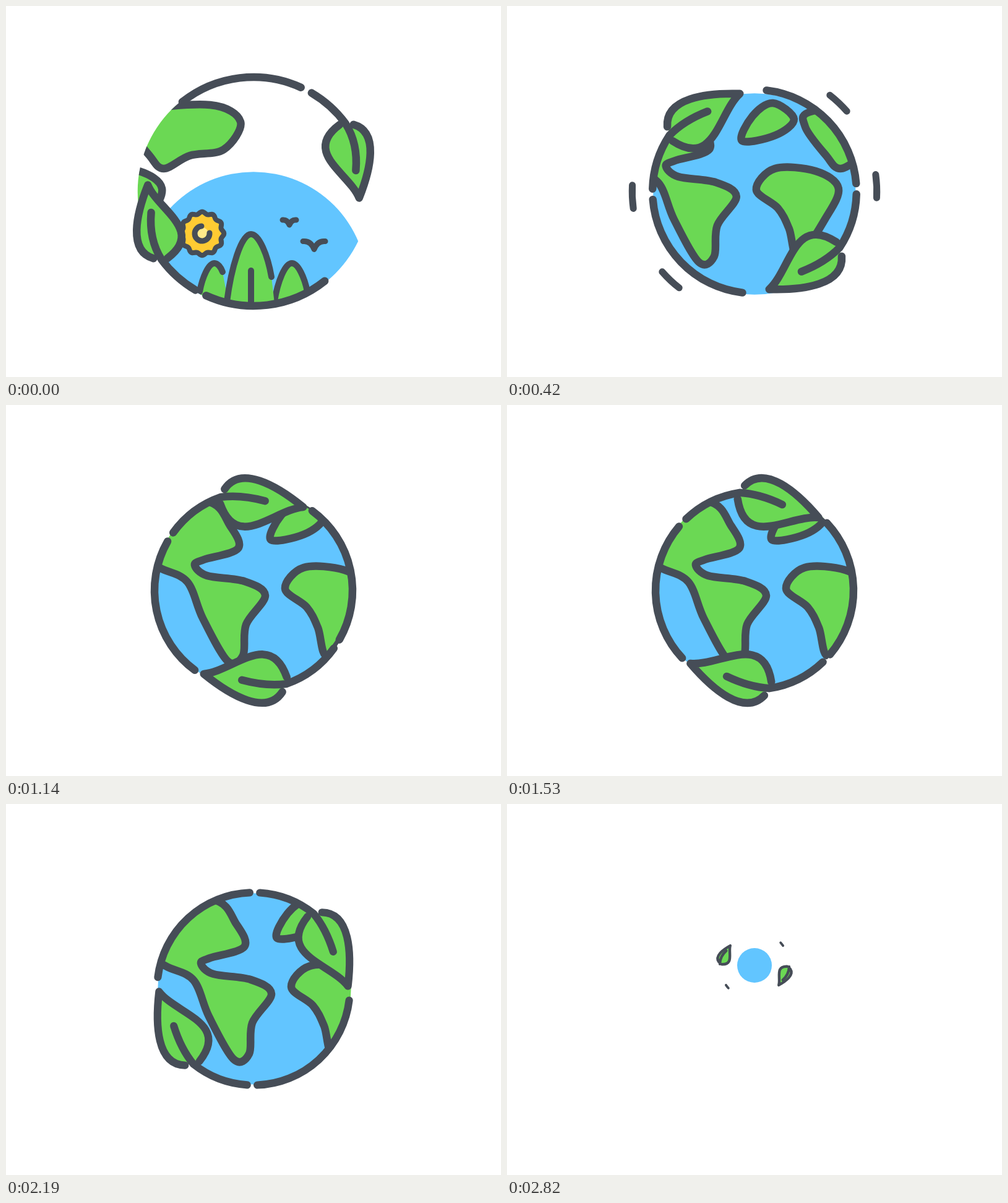
Recreate the animation shown at these times as an HTML page with a canvas. Size 800 by 600 pixels, loop 2.85 s.

```html
<!DOCTYPE html>
<html lang="en">
<head>
<meta charset="utf-8">
<title>Green planet</title>
<style>
html, body { margin: 0; width: 100%; height: 100%; overflow: hidden; background: #fff; }
canvas { display: block; width: 800px; height: 600px; }
</style>
</head>
<body>
<canvas id="stage" width="800" height="600"></canvas>
<script>
const ctx = document.getElementById('stage').getContext('2d');
const DARK = '#464d57', GREEN = '#6bd854', BLUE = '#62c5ff', GOLD = '#ffcb33';
const LOOP = 2850, STEP = 30, RADIUS = 160, RAD = Math.PI / 180;

// Key points of the coasts, in stage coordinates with the globe at rest.
const AMERICA = [[325,156],[362,195],[375,232],[320,250],[305,259],[325,276],[385,285],[419,308],
  [388,355],[383,405],[358,414],[318,345],[293,286],[248,263],[190,230],[215,165]];
const ISLAND = [[428,218],[445,178],[478,157],[512,183],[482,209]];
const AFRICA = [[451,297],[481,263],[547,267],[584,295],[562,345],[519,405],[504,360],[486,327]];
const ASIA = [[542,170],[530,195],[564,242],[587,263],[629,242],[684,232],[711,187],[662,160]];

const ramp = (t, from, to) => Math.min(1, Math.max(0, (t - from) / (to - from)));
const mix = (a, b, k) => a + (b - a) * k;
const remain = (t, end, power) => Math.pow(1 - ramp(t, 0, end), power);

function pose(t) {
  const intro = remain(t, 1140, 3.2);
  const exit = Math.max(0, t - 2030) / 790;
  const grow = p => Math.pow(exit, p);
  return {
    size: 1 + 0.156 * remain(t, 1140, 3.6) - 0.65 * grow(2),
    midY: 300 - 39 * grow(2.25),
    turn: 0.027 * t - 86.5 * intro + 233 * grow(1.3),
    tipGap: 5.6 + 42.4 * intro + 135 * grow(2.4),
    sideGap: 92 + 22 * intro + 48 * grow(3),
    young: remain(t, 1140, 3.6) + 1.4 * grow(3),
    shift: 274 * grow(2.07) - 332 * remain(t, 1140, 4.2),
    sea: 159 - 79 * grow(4),
    rise: 152 * remain(t, 660, 3.4)
  };
}

// Closed smooth curve through the points.
function loopPath(pts) {
  const at = i => pts[(i + pts.length) % pts.length];
  ctx.beginPath();
  ctx.moveTo(...pts[0]);
  pts.forEach((b, i) => {
    const a = at(i - 1), c = at(i + 1), d = at(i + 2);
    ctx.bezierCurveTo(b[0] + (c[0] - a[0]) / 6, b[1] + (c[1] - a[1]) / 6,
      c[0] - (d[0] - b[0]) / 6, c[1] - (d[1] - b[1]) / 6, c[0], c[1]);
  });
  ctx.closePath();
}

function fill(color) { ctx.fillStyle = color; ctx.fill(); }

function disc(x, y, r) {
  ctx.beginPath();
  ctx.arc(x, y, r, 0, Math.PI * 2);
}

// Angles are clockwise from straight up.
function arc(r, from, to) { ctx.arc(0, 0, r, (from - 90) * RAD, (to - 90) * RAD); }

function strokeArc(r, from, to) {
  ctx.beginPath();
  arc(r, from, to);
  ctx.stroke();
}

function land(pts) {
  loopPath(pts);
  fill(GREEN);
  ctx.stroke();
}

// The tip sits straight above the globe centre; a young leaf is smaller and tilted.
function leaf(young) {
  const k = 1 - 0.21 * young;
  ctx.save();
  ctx.translate(0, -157 + 9 * young);
  ctx.rotate(10 * young * RAD);
  ctx.scale(k, k);
  ctx.beginPath();
  ctx.moveTo(-124, 40);
  ctx.bezierCurveTo(-122, -7, -55, -8, 0, 0);
  ctx.bezierCurveTo(-38, 27, -55, 117, -118, 64);
  ctx.restore();
  fill(GREEN);
  ctx.stroke();
}

function rim({ sideGap, tipGap, young }) {
  if (tipGap < sideGap - 3) strokeArc(RADIUS, tipGap, sideGap - 3);
  const leave = mix(-50, -40, young);
  ctx.beginPath();
  arc(RADIUS, Math.min(sideGap - 177, leave - 1), leave);
  ctx.quadraticCurveTo(mix(-97, -76, young), mix(-123, -142, young),
    mix(-58, -38, young), mix(-134, -141, young));
  ctx.stroke();
}

function dash(r, mid, length) {
  for (const turn of [0, 180]) strokeArc(r, mid + turn - length / 2, mid + turn + length / 2);
}

// The right flank is drawn only part of the way down.
function tree(x, top, w, foot, reach, end) {
  const outline = () => {
    ctx.beginPath();
    ctx.moveTo(x - w, foot);
    ctx.bezierCurveTo(x - 0.82 * w, mix(top, foot, 0.5), x - 0.41 * w, top, x, top);
    ctx.bezierCurveTo(x + 0.4 * reach, top, x + 0.82 * reach, mix(top, end, 0.5), x + reach, end);
  };
  outline();
  ctx.lineTo(x + w, 490);
  ctx.lineTo(x - w, 490);
  fill(GREEN);
  outline();
  ctx.stroke();
}

function bird(x, y, w, h, size) {
  ctx.save();
  ctx.translate(x, y);
  ctx.scale(size, size);
  ctx.beginPath();
  ctx.moveTo(-w, -h);
  ctx.quadraticCurveTo(-w * 0.3, -h * 1.2, 0, h);
  ctx.quadraticCurveTo(w * 0.3, -h * 1.2, w, -h);
  ctx.stroke();
  ctx.restore();
}

function sun(size) {
  ctx.save();
  ctx.translate(317, 368);
  ctx.scale(size, size);
  ctx.beginPath();
  for (let a = 0; a < 360; a += 3) {
    const r = 33.5 + 1.8 * Math.cos(a * 12 * RAD);
    ctx.lineTo(r * Math.sin(a * RAD), -r * Math.cos(a * RAD));
  }
  ctx.closePath();
  fill(GOLD);
  ctx.lineWidth = 8;
  ctx.stroke();
  disc(0, 0, 10);
  fill('#ffe98a');
  ctx.lineWidth = 9;
  strokeArc(12, 85, 355);
  ctx.restore();
}

function landscape(t) {
  const left = 1 - ramp(t, 0, 270);
  if (!left) return;
  ctx.lineWidth = 9;
  bird(458, 350, 11, 4, left);
  bird(498, 387, 18, 6.5, left);
  sun(left);
  ctx.lineWidth = 10;
  ctx.translate(0, 130 * (1 - left));
  tree(337, 416, 24, 462, 13, 430);
  tree(462, 416, 28, 477, 25, 462);
  tree(396, 369, 39, 478, 33, 438);
  ctx.beginPath();
  ctx.moveTo(396, 428);
  ctx.lineTo(396, 482);
  ctx.stroke();
}

function draw(t) {
  const p = pose(t), size = p.size, thin = Math.max(1, size);

  ctx.setTransform(1, 0, 0, 1, 0, 0);
  ctx.fillStyle = '#fff';
  ctx.fillRect(0, 0, 800, 600);
  ctx.strokeStyle = DARK;
  ctx.lineCap = ctx.lineJoin = 'round';

  // The land slides past at full size behind the round window of the globe.
  ctx.save();
  disc(400, p.midY, (p.sea + 3) * size);
  ctx.clip();
  disc(400, p.midY + p.rise, p.sea * size);
  fill(BLUE);
  ctx.save();
  ctx.translate(p.shift, p.midY - 300);
  ctx.lineWidth = 12.5;
  [ASIA, ISLAND, AFRICA, AMERICA].forEach(land);
  ctx.restore();
  landscape(t);
  ctx.restore();

  ctx.translate(400, p.midY);
  ctx.scale(size, size);
  ctx.lineWidth = 12.5 / thin;
  for (const half of [0, 180]) {
    ctx.save();
    ctx.rotate((p.turn + half) * RAD);
    leaf(p.young);
    rim(p);
    ctx.restore();
  }

  ctx.lineWidth = 11 / thin;
  const life = ramp(t, 90, 720);
  if (life > 0 && life < 1) {
    const length = 11 * Math.pow(Math.sin(Math.PI * life), 1.5);
    dash(192, 43.5 + 0.2 * (t - 420), length);
    dash(192, 87.5 + 0.15 * (t - 420), length);
  }
  if (t > 2620) dash(160, p.turn - 77, 6.5 * ramp(t, 2620, 2800));
}

const begin = performance.now();
function tick() {
  const t = (performance.now() - begin) % LOOP;
  draw(Math.floor(t / STEP) * STEP);
  requestAnimationFrame(tick);
}
tick();
</script>
</body>
</html>
```
